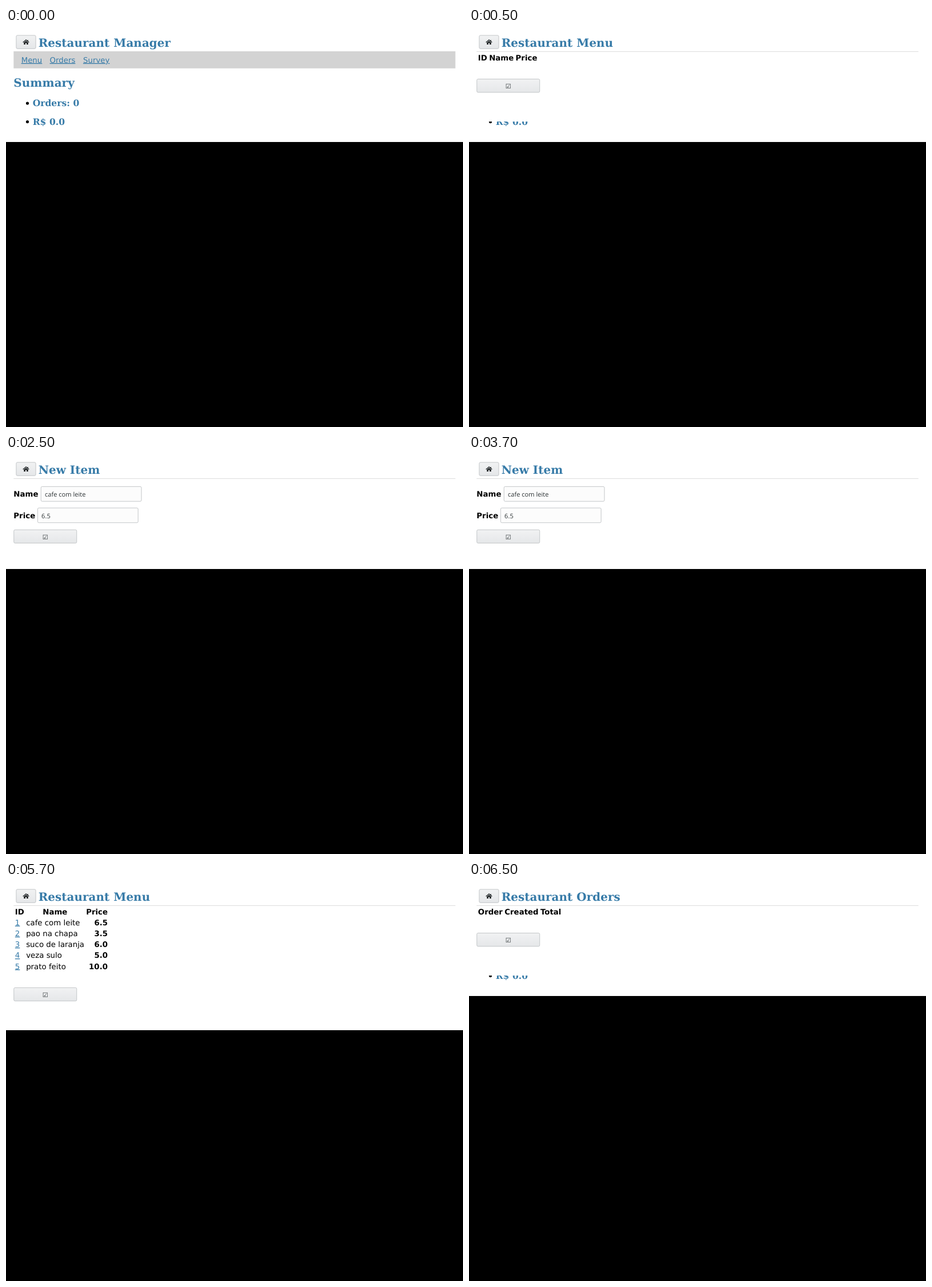
Recreate the animation shown at these times as an HTML page. Size 800 px wide and 700 px high, loop 8000 ms.

```html
<!DOCTYPE html>
<html lang="en">
<head>
<meta charset="utf-8">
<title>Restaurant Manager</title>
<style>
  html, body { margin: 0; width: 100%; height: 100%; overflow: hidden; background: #000; }
  svg { display: block; width: 800px; height: 700px; }
  text { font: 16px "DejaVu Sans", sans-serif; text-rendering: geometricPrecision; white-space: pre; }
  .bold { font-weight: bold; }
  .title { font: bold 24px "DejaVu Serif", serif; fill: #377ba8; }
  .fact { font: bold 18.72px "DejaVu Serif", serif; fill: #377ba8; }
  .link { fill: #377ba8; text-decoration: underline; text-decoration-skip-ink: none; }
  .value { font: 13.333px "Open Sans", sans-serif; fill: #2e3436; }
  .tick { font-size: 13.333px; fill: #2e3436; }
  .mid { text-anchor: middle; }
  .end { text-anchor: end; }
  .button { fill: url(#face); stroke: #b8bcbf; }
  .field { fill: #fcfcfc; stroke: #b8bcbf; }
</style>
</head>
<body>
<svg id="stage" viewBox="0 0 960 840" xmlns="http://www.w3.org/2000/svg">
  <defs>
    <linearGradient id="face" x2="0" y2="1">
      <stop stop-color="#f1f2f3"/>
      <stop offset="1" stop-color="#e5e7e9"/>
    </linearGradient>
  </defs>
</svg>
<script>
const stage = document.getElementById("stage");
const LOOP = 8000;

const text = (x, y, str, cls = "") => `<text x="${x}" y="${y}" class="${cls}">${str}</text>`;
const rect = (x, y, w, h, fill) => `<rect x="${x}" y="${y}" width="${w}" height="${h}" fill="${fill}"/>`;
const box = (x, y, w, h, cls) =>
  `<rect x="${x + .5}" y="${y + .5}" width="${w - 1}" height="${h - 1}" rx="2.5" class="${cls}"/>`;

const home = box(21, 15, 42, 29, "button") + `<g fill="#1f2426">
  <path d="M35.6 30.2L42 24.9L48.4 30.2" fill="none" stroke="#1f2426" stroke-width="1.5"/>
  <path d="M37.5 30.5L42 26.9L46.5 30.5V34.8H43.2V31.6H40.8V34.8H37.5Z"/>
  <path d="M44.8 25.2h1.7v3.4l-1.7-1.4z"/></g>`;

const page = (title, height, body) =>
  rect(0, 0, 960, height, "#fff") + body + home + text(68, 39, title, "title");
const rule = rect(16, 49, 928, 1, "#d3d3d3");
const submit = y => box(16, y, 133, 29, "button") + text(82.5, y + 20, "☑", "tick mid");
const heads = cols => cols.map(([x, str]) => text(x, 68, str, "bold")).join("");
const fact = (y, str) => `<circle cx="45" cy="${y - 6}" r="3.1"/>` + text(56, y, str, "fact");
const total = fact(203.5, "R$ 0.0");

const input = (y, label, x, value) =>
  text(16, y + 22, label, "bold") + box(x, y, 212, 32, "field") + text(x + 8.5, y + 22, value, "value");

// The lower part of the old summary stays visible under a short list.
const emptyList = (title, cols) =>
  page(title, 240, total + rect(0, 48, 960, 149, "#fff") + rule + heads(cols) + submit(107));

const summary = page("Restaurant Manager", 240,
  rect(16, 49, 928, 36, "#d3d3d3") +
  text(32, 73, "Menu", "link") + text(91.9, 73, "Orders", "link") + text(162, 73, "Survey", "link") +
  text(16, 124, "Summary", "title") + fact(164.5, "Orders: 0") + total);

const form = page("New Item", 240, rule +
  input(66, "Name", 73, "cafe com leite") + input(111, "Price", 66, "6.5") + submit(157));

const items = [
  ["cafe com leite", "6.5"],
  ["pao na chapa", "3.5"],
  ["suco de laranja", "6.0"],
  ["veza sulo", "5.0"],
  ["prato feito", "10.0"]
];
const row = ([name, price], i) => {
  const y = 91 + 23 * i;
  return text(19, y, i + 1, "link") + text(42.2, y, name) + text(213.6, y, price, "bold end");
};
const menu = page("Restaurant Menu", 312, rule +
  text(19, 68, "ID", "bold") + text(103, 68, "Name", "bold mid") + text(213.6, 68, "Price", "bold end") +
  items.map(row).join("") + submit(222));

const steps = [
  [0, summary],
  [500, emptyList("Restaurant Menu", [[19, "ID"], [42.2, "Name"], [97.9, "Price"]])],
  [2500, form],
  [4500, menu],
  [6500, emptyList("Restaurant Orders", [[19, "Order"], [74.7, "Created"], [149.9, "Total"]])]
];
stage.insertAdjacentHTML("beforeend",
  steps.map(([, body]) => `<g class="scene" display="none">${body}</g>`).join(""));
const scenes = [...stage.querySelectorAll(".scene")];

let shown = -1;
function draw() {
  const t = performance.now() % LOOP;
  const now = steps.filter(([start]) => start <= t).length - 1;
  if (now !== shown) {
    scenes.forEach((g, i) => g.setAttribute("display", i === now ? "inline" : "none"));
    shown = now;
  }
  requestAnimationFrame(draw);
}
draw();
</script>
</body>
</html>
```
